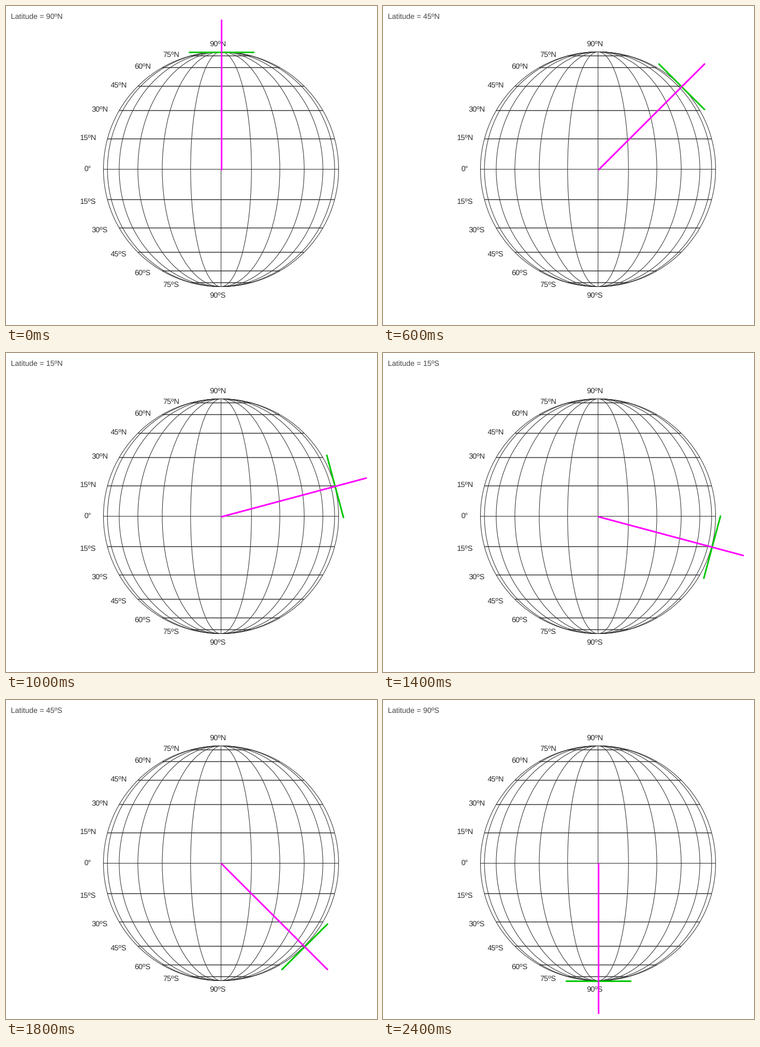
A matplotlib script for the animation above (2.6 s loop, 691 px wide and 595 px high).

```python
import matplotlib.pyplot as plt
import numpy as np
from matplotlib.animation import FuncAnimation
from matplotlib.patches import Ellipse

WIDTH, HEIGHT, DPI = 691, 595, 72  # at 72 dpi one point is one pixel
STEP = 15
GLOBE_X, GLOBE_Y, RADIUS = 400.5, 304.5, 219
PIVOT = np.array([401.5, 305.5])
RAY_LENGTH, TANGENT_HALF = 279, 60
INK = "#2b2b2b"

plt.rcParams.update({
    "font.family": "Liberation Sans",
    "font.size": 14,
    "text.hinting": "none",
    "toolbar": "None",
})

fig = plt.figure(figsize=((WIDTH + 0.01) / DPI, (HEIGHT + 0.01) / DPI),
                 dpi=DPI, facecolor="white")
ax = fig.add_axes([0, 0, 1, 1])
ax.set_xlim(0, WIDTH)
ax.set_ylim(HEIGHT, 0)
ax.axis("off")


def latitude_name(lat):
    if lat == 0:
        return "0°"
    return f"{abs(lat)}º{'N' if lat > 0 else 'S'}"


def draw_globe():
    for lon in range(STEP, 91, STEP):
        half_width = RADIUS * np.sin(np.radians(lon))
        ax.add_patch(Ellipse((GLOBE_X, GLOBE_Y), 2 * half_width, 2 * RADIUS,
                             fill=False, ec=INK, lw=1))
    ax.plot([GLOBE_X] * 2, [GLOBE_Y - RADIUS, GLOBE_Y + RADIUS],
            color=INK, lw=1, snap=False)
    for lat in range(-75, 76, STEP):
        angle = np.radians(lat)
        half = RADIUS * np.cos(angle)
        y = GLOBE_Y - RADIUS * np.sin(angle)
        ax.plot([GLOBE_X - half, GLOBE_X + half], [y, y], color=INK,
                lw=1.4 if lat else 1, snap=False, solid_capstyle="butt")


def draw_labels():
    # left edge and baselines (north, south) for each latitude
    places = {
        90: (379.5, 75, 544), 75: (292.5, 95, 524), 60: (239.5, 117, 502),
        45: (194.5, 152, 467), 30: (159.5, 197, 422), 15: (138, 250, 369),
    }
    for lat, (x, north, south) in places.items():
        ax.text(x, north, latitude_name(lat), color=INK)
        ax.text(x, south, latitude_name(-lat), color=INK)
    ax.text(145, 308, latitude_name(0), color=INK)


def pointer(color):
    line, = ax.plot([], [], color=color, lw=3, snap=False,
                    solid_capstyle="round", zorder=5)
    return line


draw_globe()
draw_labels()
tangent = pointer("#00c800")
ray = pointer("#ff00ff")
caption = ax.text(9, 24, "", color="#444444")


def update(frame):
    lat = 90 - STEP * frame
    angle = np.radians(lat)
    outward = np.array([np.cos(angle), -np.sin(angle)])
    along = np.array([np.sin(angle), np.cos(angle)])
    touch = PIVOT + RADIUS * outward
    ray.set_data(*np.transpose([PIVOT, PIVOT + RAY_LENGTH * outward]))
    tangent.set_data(*np.transpose([touch - TANGENT_HALF * along,
                                    touch + TANGENT_HALF * along]))
    caption.set_text(f"Latitude = {latitude_name(lat)}")
    return ray, tangent, caption


anim = FuncAnimation(fig, update, frames=13, interval=200, repeat=True,
                     repeat_delay=0)
plt.show()
```
